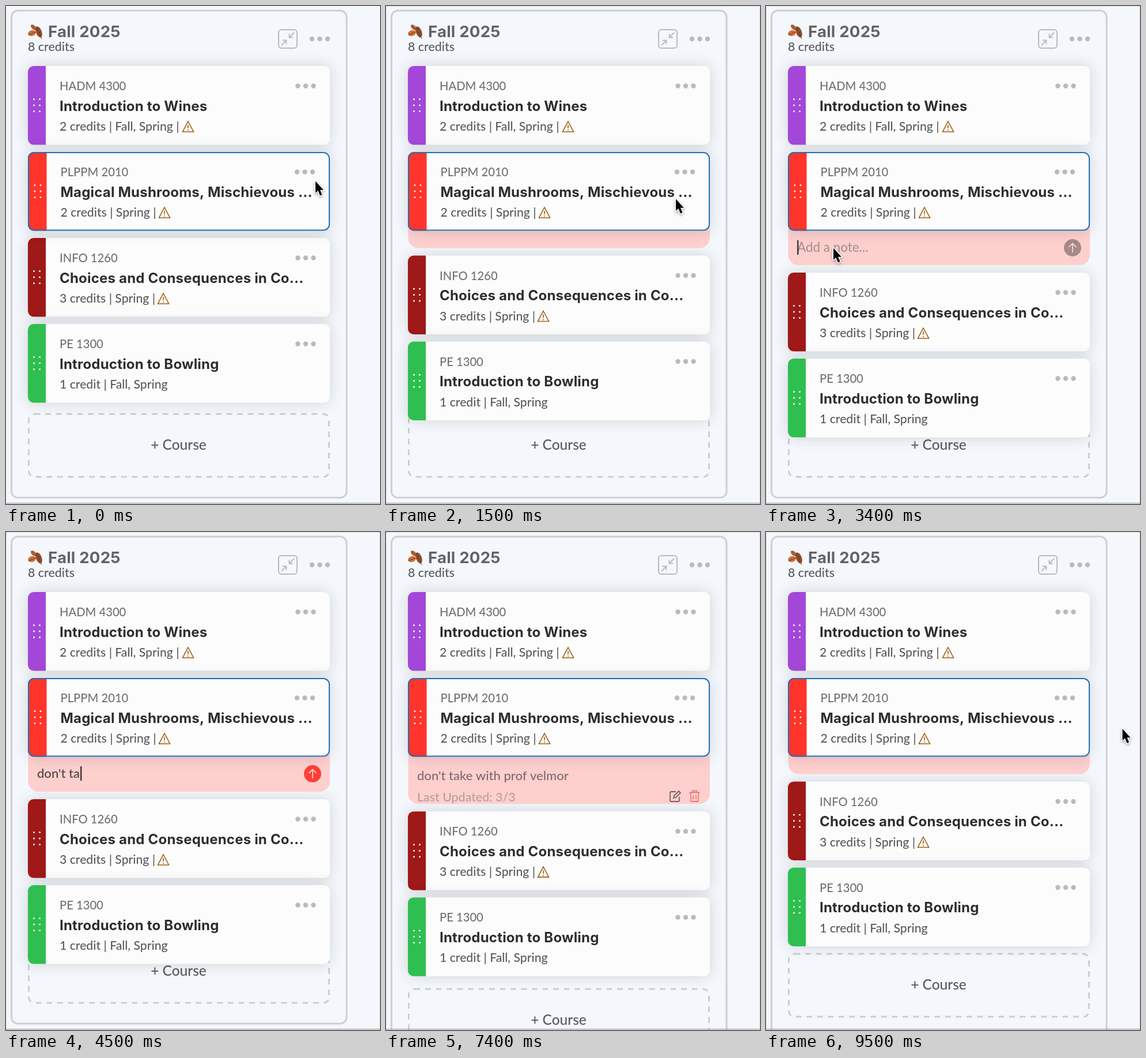
Recreate the animation shown at these times as an HTML page with a canvas. Size 649 by 863 pixels, loop 9600 ms.

```html
<!DOCTYPE html>
<html lang="en">
<head>
<meta charset="utf-8">
<title>Course notes</title>
<style>
  html, body { margin: 0; width: 100%; height: 100%; overflow: hidden; background: #f4f7fb; }
  canvas { display: block; }
</style>
</head>
<body>
<canvas id="stage" width="649" height="863"></canvas>
<script>
const c = document.getElementById('stage').getContext('2d');
const LOOP = 9600, NOTE = "don't take with prof velmor";
const TYPE_START = 3650, SAVED = 7200, LEAVE = 8450;
const GREY = '#b9babc', INFO = '#5a5a5e';

const cards = [
  { y: 104, color: '#a347d9', code: 'HADM 4300', title: 'Introduction to Wines', info: '2 credits | Fall, Spring |', warn: 316 },
  { y: 253, color: '#ff342b', code: 'PLPPM 2010', title: 'Magical Mushrooms, Mischievous ...', info: '2 credits | Spring |', warn: 275, selected: true },
  { y: 402, color: '#9e1918', code: 'INFO 1260', title: 'Choices and Consequences in Co...', info: '3 credits | Spring |', warn: 273 },
  { y: 551, color: '#2fbe50', code: 'PE 1300', title: 'Introduction to Bowling', info: '1 credit | Fall, Spring' }
];
// start, duration, height of the note below its card
const noteSteps = [[1150, 300, 30.5], [2100, 300, 60], [TYPE_START, 50, 61], [SAVED, 400, 91], [LEAVE, 300, 30.5]];
// time, x, y of the pointer
const path = [[0, 537, 302], [850, 618, 340], [1050, 618, 340], [1500, 503, 333], [2100, 400, 375], [2500, 324, 396], [3000, 117, 418]];

const clamp = v => Math.min(1, Math.max(0, v));
const easeOut = p => 1 - (1 - clamp(p)) ** 1.75;
const smooth = p => p * p * (3 - 2 * p);

function noteHeight(t) {
  return noteSteps.reduce((h, [start, time, to]) => h + (to - h) * easeOut((t - start) / time), 0);
}

function text(str, x, y, size, color, bold, align = 'left') {
  c.font = bold ? `700 ${size}px Inter, sans-serif` : `500 ${size}px Lato, sans-serif`;
  c.letterSpacing = bold ? '0.2px' : '0px';
  c.fillStyle = color;
  c.textAlign = align;
  c.fillText(str, x, y);
  return c.measureText(str).width;
}

function box(x, y, w, h, r) {
  c.beginPath();
  c.roundRect(x, y, w, h, r);
}

function fill(color) { c.fillStyle = color; c.fill(); }

function stroke(color, width) { c.strokeStyle = color; c.lineWidth = width; c.stroke(); }

function line(d, color, width) {
  c.strokeStyle = color;
  c.lineWidth = width;
  c.stroke(new Path2D(d));
}

function dot(x, y, r, color) {
  c.beginPath();
  c.arc(x, y, r, 0, 7);
  fill(color);
}

function at(x, y, draw) {
  c.save();
  c.translate(x, y);
  draw();
  c.restore();
}

function menu(x, y) {
  for (const dx of [-13.5, 0, 13.5]) dot(x + dx, y, 4.2, GREY);
}

function leaf(x, y, rx, ry, angle, color) {
  c.beginPath();
  c.ellipse(x, y, rx, ry, angle, 0, 7);
  fill(color);
}

function header() {
  leaf(48, 37, 6, 3.5, 0.7, '#b9683a');
  leaf(45, 47, 7, 5, -0.3, '#cf7038');
  leaf(57, 45, 5, 10, -0.35, '#8f4d2b');
  line('M39 50 L51 45 M44 33 L52 42 M53 36 L62 57', '#6d341c', 1);
  text('Fall 2025', 73, 54, 27.6, '#636367', true);
  text('8 credits', 38, 77.5, 21.4, INFO);
  box(473, 41, 32, 32, 5);
  stroke(GREY, 2);
  line('M500 46 L491.5 54.5 M491.5 48 V54.5 H498 M478 68 L486.5 59.5 M480 59.5 H486.5 V66', GREY, 1.8);
  menu(544.5, 57);
}

function addCourse(y) {
  box(39.5, y + 1, 521, 109, 10);
  c.setLineDash([10, 8.5]);
  stroke('#cdced0', 3);
  c.setLineDash([]);
  text('+ Course', 299.5, y + 63, 24.5, INFO, false, 'center');
}

function warning(x, y) {
  line(`M${x} ${y - 9} L${x + 9.5} ${y + 9} H${x - 9.5} Z M${x} ${y - 3} V${y + 3} M${x} ${y + 5} V${y + 7}`, '#9c5f10', 1.6);
}

function card({ y, color, code, title, info, warn, selected }, shift) {
  at(0, y + shift, () => {
    const inset = selected ? 1.5 : 0;
    c.shadowColor = 'rgba(30, 40, 50, .16)';
    c.shadowBlur = 26;
    box(38, 0, 524, 136.5, 10);
    fill('#fcfcfc');
    c.shadowColor = 'transparent';
    box(38, 0, 31 + inset, 136.5, [10, 0, 0, 10]);
    fill(color);
    for (const dx of [-5, 5])
      for (const dy of [-10.5, 0, 10.5]) dot(53.5 + inset + dx, 68 + dy, 1.5, '#fff');
    if (selected) {
      box(39, 1, 522, 134.5, 10);
      stroke('#1f6fb5', 2);
    }
    text(code, 93 + inset, 42, 20.2, '#727276');
    text(title, 93 + inset, 77.5, 24, '#2d2d30', true);
    text(info, 93 + inset, 112, 21.2, INFO);
    menu(520 - inset, 34.5);
    if (warn) warning(warn, 105);
  });
}

function noteInput(t) {
  const typed = NOTE.slice(0, Math.max(0, Math.floor((t - TYPE_START) / 100)));
  const y = 426;
  let caretX = 54;
  if (typed) caretX += text(typed, 54, y, 22, '#4b4445') + 1;
  else text('Add a note...', 54, y, 22.4, '#a99291');
  if (typed || (t > 3100 && t < TYPE_START)) {
    c.fillStyle = '#3f3b3c';
    c.fillRect(caretX, 406, 2.5, 25);
  }
  dot(532, 419, 15, typed ? '#ff4037' : '#a68a89');
  line('M532 427 V411.5 M525.5 418 L532 411.5 L538.5 418', '#fbdedd', 1.6);
}

function savedNote(height) {
  const gap = 91 - height;
  text(NOTE, 54, 433 - gap * 0.38, 22, '#4b4445');
  text('Last Updated: 3/3', 54, 464.5 + gap * 0.33, 21.4, '#a08c8c');
  line('M503 450 H495 Q493 450 493 452 V465 Q493 467 495 467 H507 Q509 467 509 465 V459 M499 461 L500 457 L508 449 L511 452 L503 460 Z', '#3d393a', 1.8);
  line('M526.5 451.5 H544.5 M532 451 V448.5 H539 V451 M528.5 452 L529.5 467 H541.5 L542.5 452 M533 456 V463 M538 456 V463', '#e9574f', 1.8);
}

function note(t, height) {
  if (height <= 0) return;
  c.save();
  box(38.5, 350, 523.5, 39 + height, [0, 0, 18, 18]);
  fill('#fdcfcd');
  c.clip();
  const saved = t >= SAVED;
  c.globalAlpha = clamp((height - (saved ? 61 : 30.5)) / 29.5);
  if (saved) savedNote(height);
  else noteInput(t);
  c.restore();
}

function pointer(x, y) {
  at(x, y + 1.5, () => {
    const arrow = new Path2D('M0 0 V20.5 L4.4 16.5 L8 25 L11.6 23.4 L8 15.2 H14 Z');
    c.shadowColor = 'rgba(0, 0, 0, .35)';
    c.shadowBlur = 4;
    c.shadowOffsetY = 2;
    c.lineJoin = 'round';
    c.strokeStyle = '#fff';
    c.lineWidth = 3;
    c.stroke(arrow);
    c.shadowColor = 'transparent';
    c.fillStyle = '#000';
    c.fill(arrow);
  });
}

function pointers(t) {
  if (t < TYPE_START) {
    const next = path.findIndex(p => p[0] > t);
    const [t1, x1, y1] = path[next < 0 ? path.length - 1 : next];
    const [t0, x0, y0] = path[next < 0 ? path.length - 1 : next - 1];
    const p = t1 > t0 ? smooth((t - t0) / (t1 - t0)) : 1;
    pointer(x0 + (x1 - x0) * p, y0 + (y1 - y0) * p);
  }
  if (t >= 8300 && t < LEAVE) pointer(117, 418);
  if (t >= 8380) pointer(615.5 + 3 * clamp((t - 8400) / 200), 339.5);
}

function draw(t) {
  const height = noteHeight(t);
  const courseY = t < SAVED ? 706 : t < LEAVE ? 791 : 730;
  c.fillStyle = '#f4f7fb';
  c.fillRect(0, 0, 649, 863);
  box(9.5, 8, 581.5, courseY + 138, 11);
  stroke('#cecfd2', 3);
  header();
  addCourse(courseY);
  card(cards[0], 0);
  card(cards[2], height);
  card(cards[3], height);
  note(t, height);
  card(cards[1], 0);
  if (t >= 100) {
    c.strokeStyle = '#dcdee1';
    c.lineWidth = 1;
    c.strokeRect(0.5, 0.5, 648, 870);
  }
  c.fillStyle = '#8f9193';
  c.fillRect(0, 861, 649, 1);
  pointers(t);
}

const begin = performance.now();
function tick() {
  draw((performance.now() - begin) % LOOP);
  requestAnimationFrame(tick);
}
tick();
</script>
</body>
</html>
```
